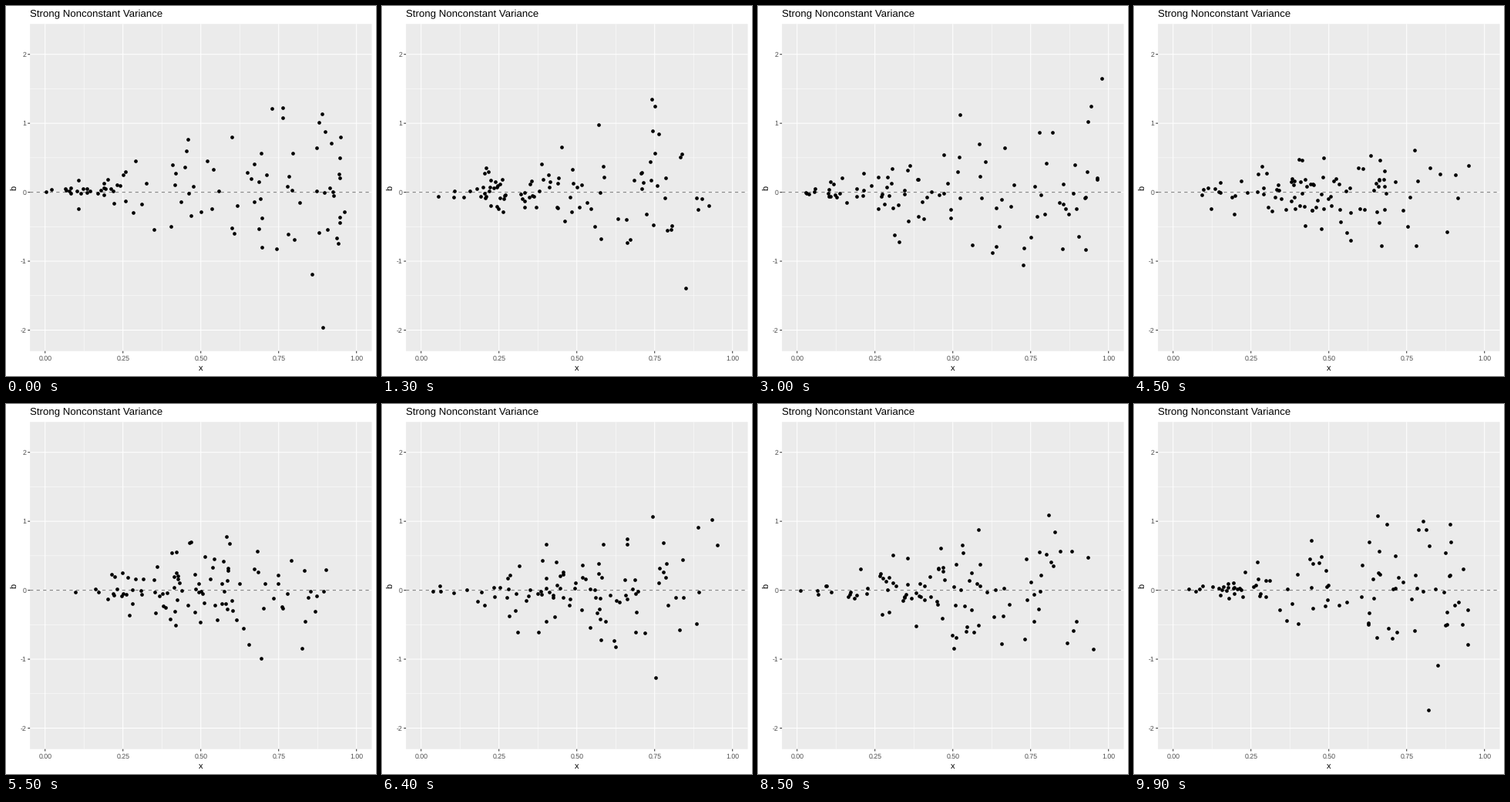
Recreate the animation shown at these times as a matplotlib script. Size 480 by 480 pixels, loop 10 s.

```python
import numpy as np
import matplotlib.pyplot as plt
from matplotlib.animation import FuncAnimation
from matplotlib.patches import Rectangle

plt.rcParams.update({"font.family": "Liberation Sans", "text.hinting": "none"})

SIZE, DPI = 480, 72          # at 72 dpi one point is one pixel
LEFT, RIGHT, TOP, BOTTOM = 31.1, 474.5, 23.3, 447.7
STATES, STEPS, COUNT = 10, 10, 100
SPREAD = 0.8                 # standard deviation of b at x = 1
THICK = 0.5 * 72.27 / 25.4 * 0.75
THIN = THICK / 2


def px(x):
    return 50.7 + 404 * x


def py(b):
    return 241.6 - 89.45 * b


# Every state is a fresh sample whose variance grows with x.
rng = np.random.default_rng(12)
xs = rng.random((STATES, COUNT))
noise = np.clip(rng.normal(size=xs.shape), -2.75, 2.75)
states = np.stack([px(xs), py(SPREAD * xs * noise)], axis=-1)


def cloud(i):
    """Linear moves between states, with a short rest after each arrival."""
    s, k = divmod(i, STEPS)
    share = k / STEPS if s == 0 else max(0, k - 1) / (STEPS - 1)
    return (1 - share) * states[s] + share * states[(s + 1) % STATES]


fig = plt.figure(figsize=(SIZE / DPI, SIZE / DPI), dpi=DPI, facecolor="white")
ax = fig.add_axes([0, 0, 1, 1])
ax.set(xlim=(0, SIZE), ylim=(SIZE, 0))
ax.axis("off")


def line(x, y, color, width, **style):
    ax.plot(x, y, color=color, lw=width, snap=False,
            solid_capstyle="butt", dash_capstyle="butt", **style)


def grid(x_values, y_values, width):
    for x in x_values:
        line([px(x)] * 2, [TOP, BOTTOM], "white", width)
    for y in y_values:
        line([LEFT, RIGHT], [py(y)] * 2, "white", width)


ax.add_patch(Rectangle((LEFT, TOP), RIGHT - LEFT, BOTTOM - TOP,
                       fc="#EBEBEB", lw=0, snap=False))
x_ticks, y_ticks = np.arange(5) / 4, np.arange(-2, 3)
grid(x_ticks[:-1] + 0.125, y_ticks[:-1] + 0.5, THIN)
grid(x_ticks, y_ticks, THICK)
line([LEFT, RIGHT], [py(0)] * 2, "#7F7F7F", THICK, ls=(0, (4, 4)))

for x in x_ticks:
    line([px(x)] * 2, [BOTTOM, BOTTOM + 2.75], "#333333", THICK)
    ax.text(px(x), 460.2, f"{x:.2f}", size=8.8, color="#4D4D4D", ha="center")
for y in y_ticks:
    line([LEFT - 2.75, LEFT], [py(y)] * 2, "#333333", THICK)
    ax.text(LEFT - 5, py(y) + 3.2, f"{y}", size=8.8, color="#4D4D4D",
            ha="right")

ax.text(LEFT, 14, "Strong Nonconstant Variance", size=13.2)
ax.text((LEFT + RIGHT) / 2, 473, "x", size=11, ha="center")
ax.text(11.5, (TOP + BOTTOM) / 2, "b", size=11, rotation=90,
        ha="center", va="center")

dots = ax.scatter(*cloud(0).T, s=4.7 ** 2, c="black", linewidths=0, zorder=3)


def draw(i):
    dots.set_offsets(cloud(i))
    return dots,


anim = FuncAnimation(fig, draw, frames=STATES * STEPS, interval=100,
                     repeat=True, repeat_delay=0)
plt.show()
```
